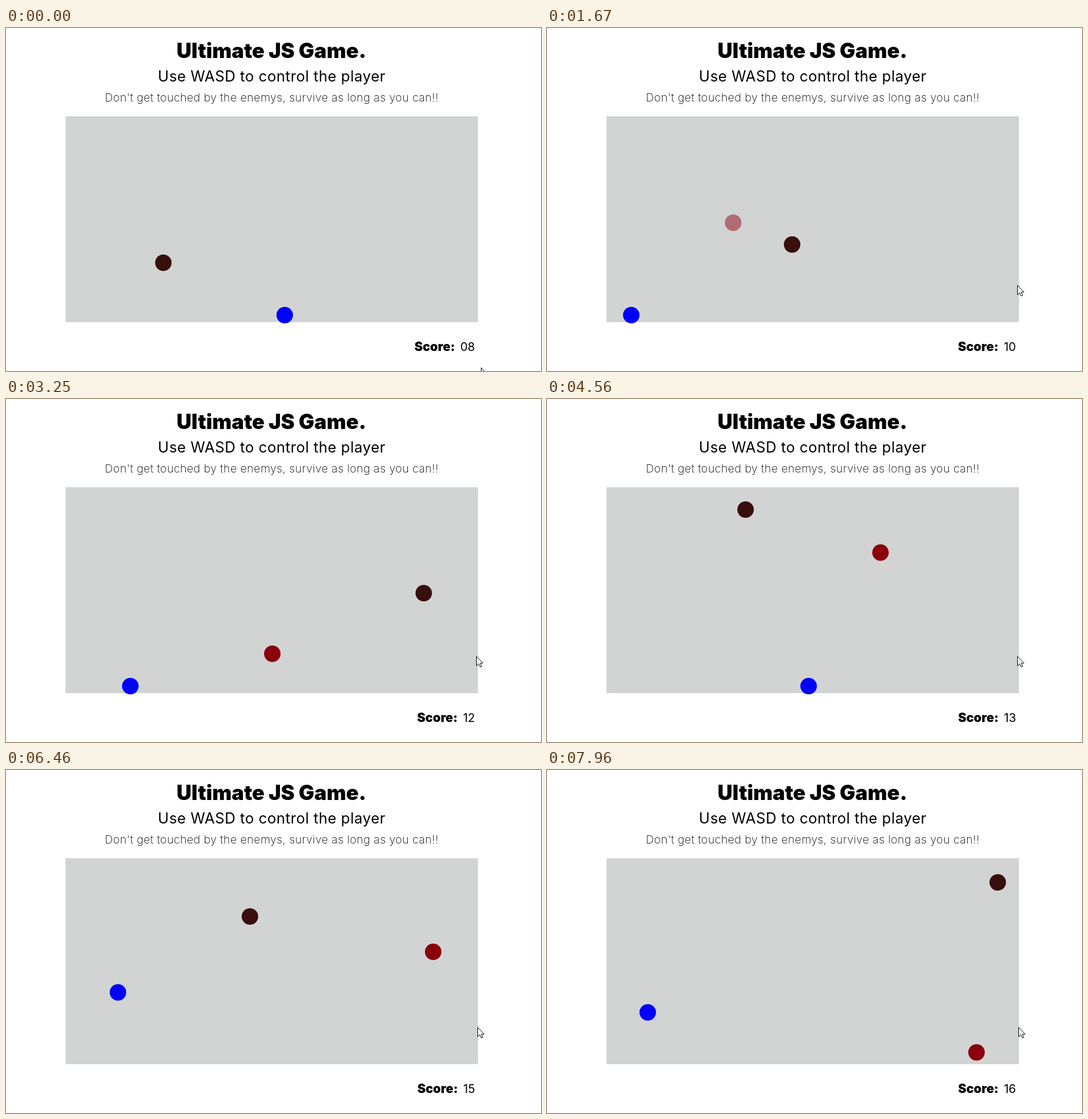
Animation, 908 px wide and 583 px high, one loop 8 s. Source, as an HTML page:

```html
<!DOCTYPE html>
<html lang="en">
<head>
<meta charset="utf-8">
<title>Ultimate JS Game</title>
<style>
  html, body { margin: 0; width: 100%; height: 100%; overflow: hidden; background: #fff; }
  svg { display: block; width: 908px; height: 583px; font-family: Inter, "Open Sans", sans-serif; }
  .headline { text-anchor: middle; }
  .title { font-size: 35px; font-weight: 900; }
  .hint { font-size: 25px; font-weight: 400; letter-spacing: .5px; }
  .rules { font-size: 19px; font-weight: 200; letter-spacing: .4px; }
  .score { font-size: 20px; font-weight: 400; text-anchor: end; }
  .label { font-size: 21px; font-weight: 900; }
</style>
</head>
<body>
<svg viewBox="0 0 908 583">
  <text class="headline title" x="450.5" y="51">Ultimate JS Game.</text>
  <text class="headline hint" x="451" y="91">Use WASD to control the player</text>
  <text class="headline rules" x="451" y="125">Don't get touched by the enemys, survive as long as you can!!</text>
  <rect x="101" y="150" width="700" height="350" fill="#d2d4d3"/>
  <text class="score" x="796" y="549"><tspan class="label">Score:</tspan><tspan id="points" dx="9">08</tspan></text>
  <circle id="player" r="14" fill="#00f"/>
  <circle id="hunter" r="14" fill="#380f0d"/>
  <circle id="rookie" r="14" fill="#8b000d"/>
  <path id="cursor" d="M.5 .5V16.5L4.2 13L6.7 18.5L9.2 17.4L6.8 12H11.5Z" fill="#fff" stroke="#000"/>
</svg>
<script>
const LOOP = 8;
const SPAWN = 1.06, FADE = 1.25;
const FIELD = { left: 114, right: 787, top: 164, bottom: 486 };

// Key points as [seconds, value].
const travelled = [[0, 0], [.82, 287], [5.66, 2142], [8, 2972]];
const playerX = [[0, 473], [1.7, 137], [1.95, 137], [2.7, 285], [3.57, 168],
                 [4.77, 502], [5.26, 502], [6.46, 190], [7.3, 151], [8, 172]];
const playerY = [[5.75, 488], [6.46, 378], [6.9, 319], [7.1, 319], [8, 416]];

const clamp = v => Math.min(1, Math.max(0, v));
const mix = (a, b, k) => a + (b - a) * clamp(k);

function along(points, s) {
  const i = points.findIndex(p => p[0] > s);
  if (i < 0) return points[points.length - 1][1];
  if (i === 0) return points[0][1];
  const [t0, a] = points[i - 1], [t1, b] = points[i];
  return mix(a, b, (s - t0) / (t1 - t0));
}

// Reflects a straight path between two walls.
function bounce(position, min, max) {
  const span = max - min, turn = 2 * span;
  const phase = ((position - min) % turn + turn) % turn;
  return min + span - Math.abs(span - phase);
}

const bounceX = x => bounce(x, FIELD.left, FIELD.right);
const bounceY = y => bounce(y, FIELD.top, FIELD.bottom);

const $ = id => document.getElementById(id);
function place(id, x, y) {
  $(id).setAttribute('transform', `translate(${Math.round(x)} ${Math.round(y)})`);
}

function draw(s) {
  const d = along(travelled, s);
  place('hunter', bounceX(267 - .7417 * d), bounceY(399 + d));
  place('rookie', bounceX(177 + .2259 * d), bounceY(120.5 + .3433 * d));
  $('rookie').setAttribute('opacity', clamp((s - SPAWN) / FADE));
  place('player', along(playerX, s), along(playerY, s));
  place('cursor', mix(806, 798, s / .35) + mix(0, 2, (s - 5.9) / .2), mix(577, 437, s / .35));
  $('points').textContent = String(8 + Math.floor(s + .94)).padStart(2, '0');
}

const start = performance.now();
function tick() {
  draw((performance.now() - start) / 1000 % LOOP);
  requestAnimationFrame(tick);
}
tick();
</script>
</body>
</html>
```
